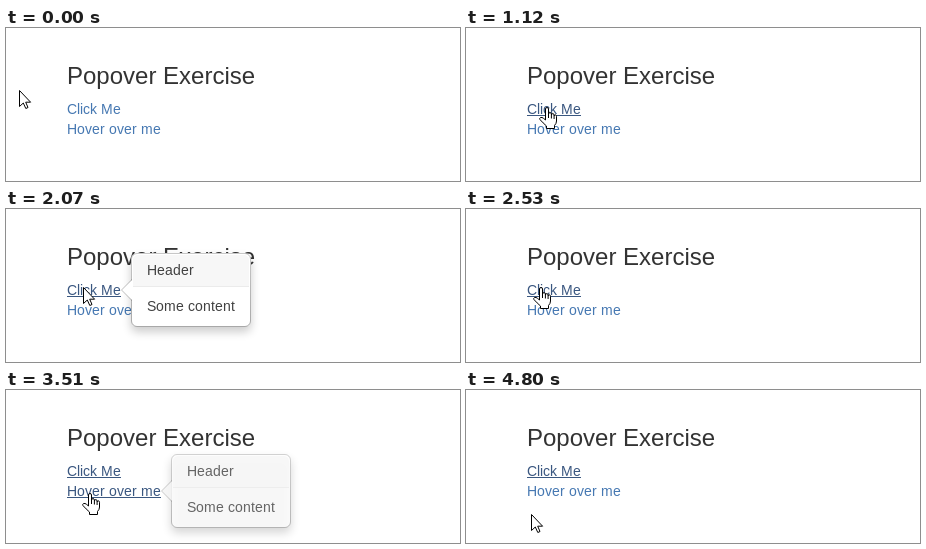
Recreate the animation shown at these times as an HTML page with a canvas. Size 454 px wide and 153 px high, loop 5.02 s.

```html
<!DOCTYPE html>
<html lang="en">
<head>
<meta charset="utf-8">
<title>Popover Exercise</title>
<style>
html, body { margin: 0; width: 100%; height: 100%; overflow: hidden; background: #fff; }
canvas { display: block; width: 454px; height: 153px; }
</style>
</head>
<body>
<canvas id="stage" width="454" height="153"></canvas>
<script>
const ctx = document.getElementById('stage').getContext('2d');
const LOOP = 5020, FADE = 150, PRESS = 60;
const FONT = '"Liberation Sans", Arial, sans-serif';
const INK = '#333', SOFT_INK = '#414141', LINK = '#4678b2', ACTIVE = '#3a5780';

const clickLink = { text: 'Click Me', x: 61, y: 86, w: 54, open: 1140, close: 2150 };
const hoverLink = { text: 'Hover over me', x: 61, y: 106, w: 94, open: 3390, close: 4490 };
const presses = [1060, 2070];

// Pointer strokes; bow bends the path down, or up when negative
const home = { x: 13, y: 62 };
const strokes = [
  { start: 140, end: 620, steps: 7, x: 63, y: 72, bow: -5 },
  { start: 700, end: 840, steps: 3, x: 77, y: 78, bow: 0 },
  { start: 2530, end: 2990, steps: 7, x: 17, y: 88, bow: -5 },
  { start: 3060, end: 3510, steps: 7, x: 80, y: 102, bow: 7.5 },
  { start: 4420, end: 4800, steps: 6, x: 65, y: 124, bow: 0 }
];

const arrow = new Path2D('M.5 .5V16.5L4.3 13L6.8 18.5L9 17.5L6.7 12.2H11.6Z');
const hand = new Path2D(
  'M6.5 13V2Q6.5 .5 8 .5T9.5 2V7Q9.7 5.6 11 5.6T12.4 7V8Q12.6 6.6 13.8 6.6T15.1 8' +
  'V9Q15.3 7.8 16.3 7.8T17.5 9.3V14Q17.5 16.5 15.5 18.5V21.5H7.5V19' +
  'Q4 16 1 12.6Q.2 11.2 1.4 10.6Q3 9.9 4.6 11.4Z');
const knuckles = new Path2D('M9.5 7V11M12.4 8V11.5M15.1 9V12');

const clamp = v => Math.min(1, Math.max(0, v));
const ease = p => (p + p * p * (3 - 2 * p)) / 2;

// The pointer moves in even, discrete steps along each stroke
function pointerAt(t) {
  let from = home, pos = home;
  for (const s of strokes) {
    if (t < s.start) break;
    const gap = (s.end - s.start) / (s.steps - 1);
    const p = ease(clamp((Math.floor((t - s.start) / gap + 1e-6) + 1) / s.steps));
    pos = {
      x: Math.round(from.x + (s.x - from.x) * p),
      y: Math.round(from.y + (s.y - from.y) * p + s.bow * Math.sin(Math.PI * p))
    };
    from = s;
  }
  return pos;
}

const fadeAt = (link, t) =>
  clamp((t - link.open) / FADE) - clamp((t - link.close) / FADE);

// Body text advances by whole pixels
function drawText(text, x, y, color) {
  ctx.font = '14px ' + FONT;
  ctx.fillStyle = color;
  for (const ch of text) {
    ctx.fillText(ch, x, y);
    x += Math.round(ctx.measureText(ch).width);
  }
}

function drawLink(link, active) {
  drawText(link.text, link.x, link.y, active ? ACTIVE : LINK);
  if (active) ctx.fillRect(link.x, link.y + 1, link.w, 1);
}

function box(x, y, w, h, r) {
  ctx.beginPath();
  ctx.roundRect(x, y, w, h, r);
}

function triangle(x, y, size, color) {
  ctx.beginPath();
  ctx.moveTo(x, y);
  ctx.lineTo(x + size, y - size);
  ctx.lineTo(x + size, y + size);
  ctx.fillStyle = color;
  ctx.fill();
}

function drawPopover(link, alpha) {
  if (!alpha) return;
  const x = link.x + link.w + 10, y = link.y - 42;
  ctx.save();
  ctx.globalAlpha = alpha;

  ctx.save();
  ctx.shadowColor = 'rgba(0,0,0,.2)';
  ctx.shadowBlur = 10;
  ctx.shadowOffsetY = 5;
  ctx.fillStyle = '#fff';
  box(x, y, 120, 74, 6);
  ctx.fill();
  ctx.restore();

  // The border darkens downwards with the shadow behind it
  const edge = ctx.createLinearGradient(0, y, 0, y + 74);
  edge.addColorStop(0, 'rgba(0,0,0,.22)');
  edge.addColorStop(1, 'rgba(0,0,0,.34)');
  ctx.strokeStyle = edge;
  ctx.lineWidth = 1;
  box(x + .5, y + .5, 119, 73, 5.5);
  ctx.stroke();

  ctx.fillStyle = '#f7f7f7';
  box(x + 2, y + 2, 116, 31, [5, 5, 0, 0]);
  ctx.fill();
  ctx.fillStyle = '#ebebeb';
  ctx.fillRect(x + 2, y + 33, 116, 1);

  triangle(x - 10, y + 37, 11, 'rgba(0,0,0,.25)');
  triangle(x - 9, y + 37, 10, '#fff');

  drawText('Header', x + 16, y + 22, SOFT_INK);
  drawText('Some content', x + 16, y + 58, SOFT_INK);
  ctx.restore();
}

function drawPointer(x, y, isHand) {
  const shape = isHand ? hand : arrow;
  ctx.save();
  ctx.translate(isHand ? x - 4 : x, isHand ? y + 1 : y);
  ctx.fillStyle = '#fff';
  ctx.strokeStyle = '#000';
  ctx.lineWidth = 1;
  ctx.lineJoin = 'round';
  ctx.fill(shape);
  ctx.stroke(shape);
  if (isHand) ctx.stroke(knuckles);
  ctx.restore();
}

function over(link, { x, y }) {
  return x >= link.x && x < link.x + link.w && y >= link.y - 14 && y < link.y + 3;
}

function draw(t) {
  const pos = pointerAt(t);
  const onClick = over(clickLink, pos), onHover = over(hoverLink, pos);
  const pressed = presses.some(p => t >= p && t < p + PRESS);

  ctx.fillStyle = '#fff';
  ctx.fillRect(0, 0, 454, 153);
  ctx.fontKerning = 'none';
  ctx.font = '24px ' + FONT;
  ctx.fillStyle = INK;
  ctx.fillText('Popover Exercise', 61, 56);

  // The first link keeps focus once pressed
  drawLink(clickLink, onClick || t >= presses[0]);
  drawLink(hoverLink, onHover);
  for (const link of [clickLink, hoverLink]) drawPopover(link, fadeAt(link, t));
  drawPointer(pos.x, pos.y, (onClick || onHover) && !pressed);
}

function tick() {
  draw(performance.now() % LOOP);
  requestAnimationFrame(tick);
}
tick();
</script>
</body>
</html>
```
